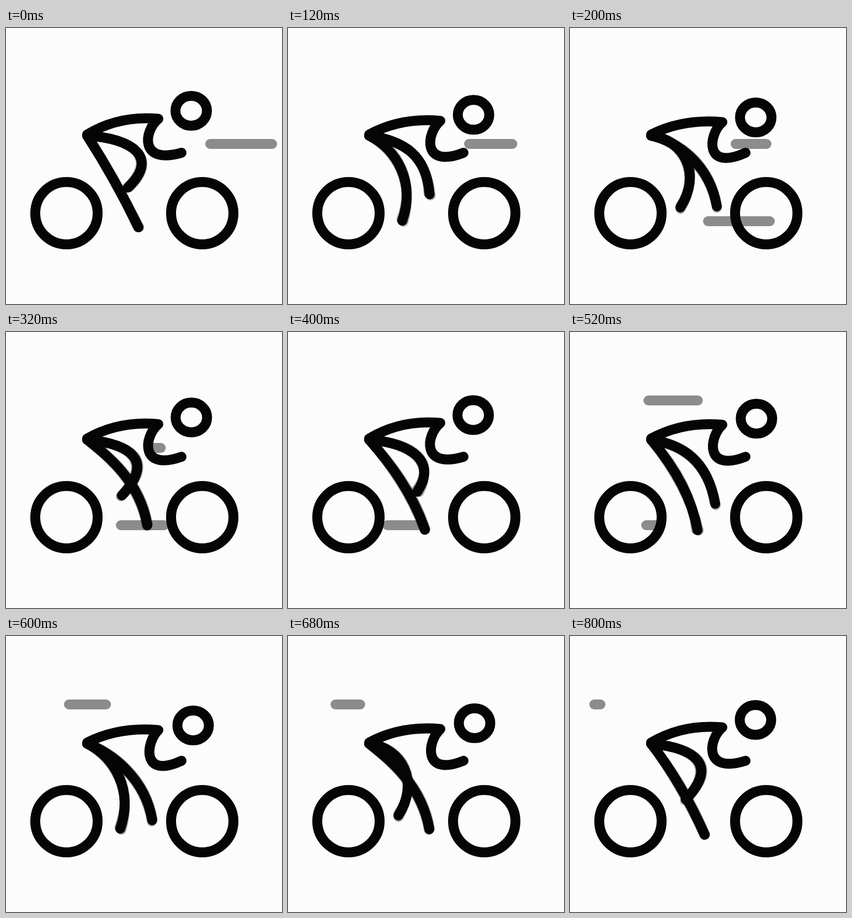
An HTML page with a canvas that plays this animation: 500x500 px, repeating every 0.84 s.

```html
<!DOCTYPE html>
<html lang="en">
<head>
<meta charset="utf-8">
<title>Cyclist</title>
<style>
  html, body { margin: 0; height: 100%; overflow: hidden; background: #fcfcfc; }
  canvas { display: block; }
</style>
</head>
<body>
<canvas id="stage" width="500" height="500"></canvas>
<script>
const ctx = document.getElementById('stage').getContext('2d');
const LOOP = 840, STEP = 40, LEG_DELAY = 480;

// time, first control point, second control point, foot
const LEG = [
  [0,   179, 245, 212, 304, 240, 361],
  [40,  185, 240, 220, 296, 231, 359],
  [120, 197, 220, 231, 279, 207, 349],
  [200, 207, 203, 239, 264, 200, 325],
  [320, 225, 203, 270, 232, 210, 296],
  [360, 230, 200, 278, 235, 221, 289],
  [440, 219, 205, 257, 235, 247, 294],
  [520, 203, 204, 249, 232, 263, 311],
  [560, 196, 206, 253, 248, 266, 323],
  [680, 181, 222, 242, 268, 256, 350],
  [800, 182, 240, 216, 297, 244, 360]
];

// time, head centre
const HEAD = [
  [0, 335.5, 150], [100, 336, 156], [200, 336.5, 162], [320, 335.8, 154.8],
  [400, 335.5, 150.5], [440, 336, 152.3], [520, 337.8, 157],
  [600, 339, 162], [680, 338, 158], [800, 336, 152]
];

// start time, left end, height
const STREAKS = [[0, 370, 210], [200, 250, 350], [440, 170, 124]];

// Smooth cyclic interpolation through unevenly spaced keys
function sample(keys, time) {
  const t = ((time % LOOP) + LOOP) % LOOP;
  const n = keys.length;
  const key = i => {
    const turn = Math.floor(i / n);
    const [at, ...values] = keys[i - turn * n];
    return [at + turn * LOOP, ...values];
  };
  let i = n - 1;
  while (keys[i][0] > t) i--;
  const [a, b, c, d] = [key(i - 1), key(i), key(i + 1), key(i + 2)];
  const [h0, h, h2] = [b[0] - a[0], c[0] - b[0], d[0] - c[0]];
  const u = (t - b[0]) / h;
  return b.slice(1).map((from, j) => {
    const k = j + 1;
    const slope = (c[k] - from) / h;
    const m0 = ((from - a[k]) / h0 * h + slope * h0) / (h0 + h);
    const m1 = (slope * h2 + (d[k] - c[k]) / h2 * h) / (h + h2);
    const move = u * u * (3 - 2 * u);
    return from + (c[k] - from) * move
      + h * u * (1 - u) * ((1 - u) * m0 - u * m1);
  });
}

function stroke(build, color = '#050505') {
  ctx.strokeStyle = color;
  ctx.beginPath();
  build();
  ctx.stroke();
}

function ring(x, y, rx, ry = rx) {
  stroke(() => ctx.ellipse(x, y, rx, ry, 0, 0, Math.PI * 2));
}

function streak(t, [start, x, y]) {
  const age = t - start;
  if (age < 0 || age >= 400) return;
  stroke(() => {
    ctx.moveTo(x - age * 0.35, y);
    ctx.lineTo(x + 112 - age * 0.63, y);
  }, '#8c8c8c');
}

function legAt(t) {
  stroke(() => {
    ctx.moveTo(147, 195);
    ctx.bezierCurveTo(...sample(LEG, t));
  });
}

function leg(t) {
  ctx.globalAlpha = 0.25;
  for (const blur of [-10, -5, 5, 10]) legAt(t + blur);
  ctx.globalAlpha = 1;
  legAt(t);
}

function upperBody(t) {
  const [x, y] = sample(HEAD, t);
  const lean = x - 335.5, dip = y - 150;
  const shoulder = 164.5 + dip / 2;
  ring(x, y, 28.5, 27);
  stroke(() => {
    ctx.moveTo(147, 193);
    ctx.quadraticCurveTo(205, 158 + dip / 2, 276, shoulder);
    ctx.bezierCurveTo(249 + lean, 187 + dip / 2, 242 + lean, 248 + dip, 318, 226);
  });
}

function draw(now) {
  const t = Math.floor((now % LOOP) / STEP) * STEP;
  ctx.fillStyle = '#fcfcfc';
  ctx.fillRect(0, 0, 500, 500);
  STREAKS.forEach(s => streak(t, s));
  ring(109.5, 335.5, 56.5);
  ring(355.5, 335.5, 56.5);
  leg(t);
  leg(t - LEG_DELAY);
  upperBody(t);
}

ctx.lineWidth = 18;
ctx.lineCap = ctx.lineJoin = 'round';
const begin = performance.now();
function tick() {
  draw(performance.now() - begin);
  requestAnimationFrame(tick);
}
tick();
</script>
</body>
</html>
```
